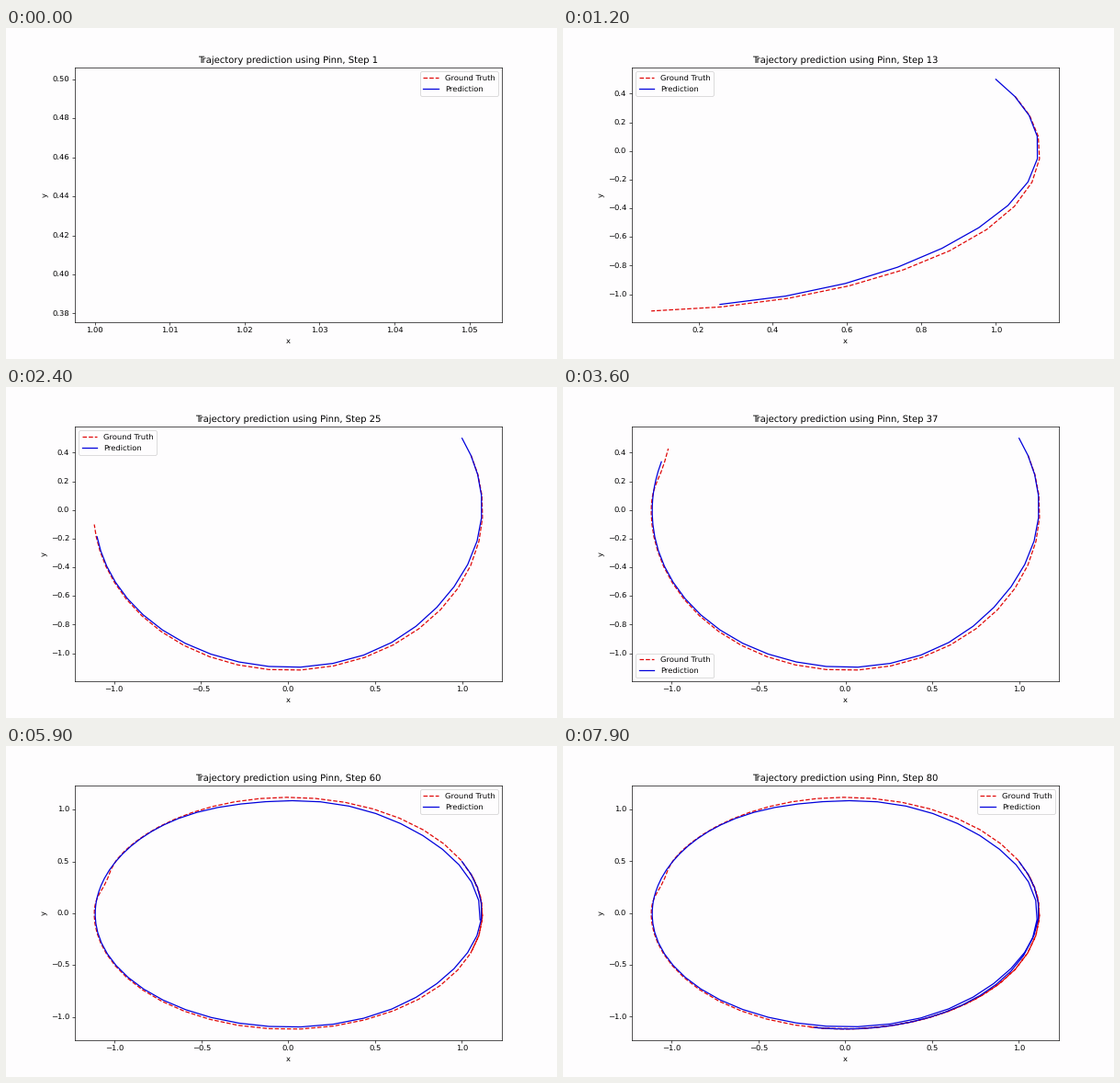
A matplotlib script for the animation above (8 s loop, 600 by 360 pixels).

```python
import matplotlib.pyplot as plt
import numpy as np
from matplotlib.animation import FuncAnimation

STEPS = 80
PAPER = "#fefdfe"
RED = "#e00808"
BLUE = "#0000dc"
START = np.degrees(np.arctan(0.5))

plt.rcParams.update({"text.hinting": "none", "figure.facecolor": PAPER,
                     "axes.facecolor": PAPER})


def polar(phase, radius):
    """Clockwise phase in degrees to x, y."""
    a = np.radians(phase)
    return radius * np.cos(a), -radius * np.sin(a)


def dent(phase, centre, width, depth):
    """Smooth inward dip of a circle around one angle."""
    return depth * np.exp(-((phase - centre) / width) ** 2 / 2)


# Degrees per step: the orbit swings between fast and nearly stalled.
keys = [(0, 6.64), (5, 8.95), (12, 9.8), (18, 8), (23, 5.2), (30, 0),
        (36, 4.8), (41, 5.3), (49, 8.9), (58, 9.7), (72, 2.2), (79, 1)]
speed = np.interp(np.arange(STEPS), *zip(*keys))
phase = np.concatenate([[0], np.cumsum(speed)]) - START

# The truth is a circle with one dent where it stalls.
true_phase = phase[1:]
true_x, true_y = polar(true_phase, 1.1187 - dent(true_phase, 196, 5.5, 0.026))

# The prediction trails it, falls further behind after the stall and sags inwards.
step = np.arange(1, STEPS + 1)
lag = 1 + 0.8 * np.clip((step - 36) / 9, 0, 1)
pred_phase = np.interp(step - lag, np.arange(STEPS + 1), phase)
sags = [(35, 18, 0.024), (100, 30, 0.021), (195, 20, 0.006),
        (262, 14, 0.03), (315, 24, 0.04), (385, 20, 0.012)]
pred_r = np.sqrt(1.25) - sum(dent(pred_phase, *s) for s in sags)
pred_x, pred_y = polar(pred_phase, pred_r)

fig, ax = plt.subplots(figsize=(10, 6), dpi=60)


def update(i):
    n = i + 1
    ax.clear()
    ax.plot(true_x[:n], true_y[:n], "--", color=RED, label="Ground Truth")
    ax.plot(pred_x[:n], pred_y[:n], color=BLUE, label="Prediction")
    ax.set_title(f"Trajectory prediction using Pinn, Step {n}")
    ax.set_xlabel("x")
    ax.set_ylabel("y")
    ax.legend()


anim = FuncAnimation(fig, update, frames=STEPS, interval=100, repeat=True,
                     repeat_delay=0)
plt.show()
```
